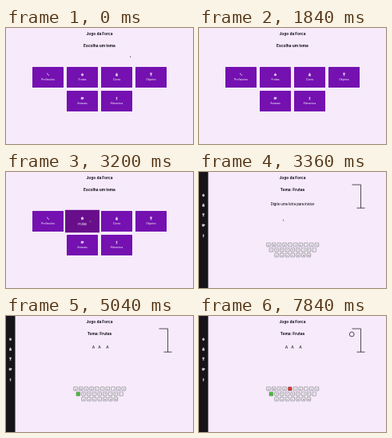
An HTML page for the animation above (8 s loop, 234 by 146 pixels).

```html
<!DOCTYPE html>
<html lang="pt">
<head>
<meta charset="utf-8">
<style>
  html, body { margin: 0; width: 100%; height: 100%; overflow: hidden; background: #f6eafb; }
  svg { display: block; width: 100vw; height: 100vh; }
  text { font-family: Inter, "Open Sans", sans-serif; text-anchor: middle; fill: #15101a; }
  .title { font-size: 4.8px; font-weight: 700; }
  .label { font-size: 3.4px; fill: #fff; }
  .key { font-size: 2.5px; fill: #333; }
</style>
</head>
<body>
<svg id="stage" viewBox="0 0 234 146">
  <rect width="234" height="146" fill="#f6eafb"/>
  <text class="title" x="117" y="8.8">Jogo da Forca</text>
  <g id="menu">
    <text class="title" x="117" y="24.2">Escolha um tema</text>
  </g>
  <g id="game">
    <rect width="11.5" height="146" fill="#171419"/>
    <text class="title" x="117" y="24.2">Tema: Frutas</text>
    <text id="hint" x="117" y="42" font-size="4.2" font-weight="500">Digite uma letra para iniciar</text>
    <g id="word" font-size="5"></g>
    <g fill="none" stroke="#2b2430" stroke-width="0.8">
      <path d="M191.5 16H202.5V45.3M197.5 45.3H207.5"/>
      <circle id="head" cx="191.2" cy="23" r="2.9"/>
    </g>
  </g>
  <path id="cursor" d="M0 0V2.3L.6 1.8L1.6 1.7Z" fill="#222" stroke="#fff" stroke-width="0.2"/>
</svg>
<script>
const $ = id => document.getElementById(id);
const LOOP = 8000, STEP = 80;
const PURPLE = [116, 17, 176], HOVER = [104, 14, 139];
const WHITE = [250, 246, 252], GREEN = [76, 211, 55], RED = [237, 54, 54];

function add(parent, tag, attrs, text) {
  const el = document.createElementNS("http://www.w3.org/2000/svg", tag);
  for (const k in attrs) el.setAttribute(k, attrs[k]);
  if (text) el.textContent = text;
  parent.append(el);
  return el;
}

const icons = [
  "M-1.6 -1.3L1.5 1.6M-1.5 -.2L0 -1.6M.4 1.4L1.6 .2",
  "M-1.2 -.4H1.2L.8 1.6H-.8ZM0 -.4V-1.7",
  "M0 -1.7L1 0V1.5H-1V0ZM-1.5 1.6H1.5",
  "M-1 -1.6H1L.6 .2H-.6ZM0 .2V1.5M-1 1.6H1",
  "M-1.4 -1.2V1.2H.8V0H1.6V-1H.4Z",
  "M0 -1.7V1.6M-1 -.8L0 .2L1 -.8M-1 1.6H1"
];
const icon = (parent, i, x, y) => add(parent, "path", {
  d: icons[i], transform: `translate(${x} ${y})`,
  fill: "#fff", "fill-opacity": 0.7, stroke: "#fff", "stroke-width": 0.5
});

// Theme cards, drawn around their own centres
const themes = ["Profissões", "Frutas", "Cores", "Objetos", "Animais", "Alimentos"];
const cards = themes.map((name, i) => {
  const x = i < 4 ? 52.5 + 43 * i : 95.5 + 43 * (i - 4);
  const y = i < 4 ? 62 : 92;
  const g = add($("menu"), "g", { transform: `translate(${x} ${y})` });
  const box = add(g, "rect", { x: -19.5, y: -13, width: 39, height: 26, rx: 0.6, fill: `rgb(${PURPLE})` });
  icon(g, i, 0, -3.6);
  add(g, "text", { class: "label", y: 4.4 }, name);
  return { g, box, x, y };
});

[29, 41.5, 54, 67, 80].forEach((y, i) => icon($("game"), i + 1, 5.5, y));

const keys = {};
["QWERTYUIOP", "ASDFGHJKL", "ZXCVBNM"].forEach((row, r) => {
  [...row].forEach((ch, i) => {
    const x = 117.2 + (i - (row.length - 1) / 2) * 6.72, y = 91.6 + r * 6.5;
    keys[ch] = add($("game"), "rect", {
      x: x - 2.3, y: y - 2.3, width: 4.6, height: 4.6, rx: 0.5,
      fill: `rgb(${WHITE})`, stroke: "#55505a", "stroke-width": 0.5
    });
    add($("game"), "text", { class: "key", x, y: y + 0.9 }, ch);
  });
});

[109.5, 117, 127].forEach(x => add($("word"), "text", { x, y: 41 }, "A"));

const path = [[0, 155, 35], [640, 155, 35], [880, 136, 42], [1600, 114, 50],
  [2080, 114, 50], [2320, 114, 51.5], [2560, 105, 61], [3200, 105, 61], [3360, 105, 59.5], [LOOP, 105, 59.5]];

const ramp = (t, from, to) => Math.min(1, Math.max(0, (t - from) / (to - from)));
const mix = (a, b, p) => a.map((v, i) => v + (b[i] - v) * p);
const paint = (el, a, b, p) => el.setAttribute("fill", `rgb(${mix(a, b, p).map(Math.round)})`);
const show = (el, on) => el.setAttribute("visibility", on ? "visible" : "hidden");

function cursorAt(t) {
  const i = path.findIndex((p, n) => n && p[0] >= t);
  const [t0, ...a] = path[i - 1], [t1, ...b] = path[i];
  return mix(a, b, ramp(t, t0, t1));
}

function draw(t) {
  const playing = t >= 3360, guessed = t >= 4800;
  $("menu").style.display = playing ? "none" : "";
  $("game").style.display = playing ? "" : "none";

  const hover = ramp(t, 1920, 2160), card = cards[1];
  paint(card.box, PURPLE, HOVER, hover);
  card.g.setAttribute("transform", `translate(${card.x} ${card.y}) scale(${1 + 0.1 * hover})`);

  show($("hint"), !guessed);
  show($("word"), guessed);
  show($("head"), t >= 6320);
  paint(keys.A, WHITE, GREEN, ramp(t, 4720, 5040));
  paint(keys.T, WHITE, RED, ramp(t, 6240, 6560));

  show($("cursor"), t < 4160);
  $("cursor").setAttribute("transform", `translate(${cursorAt(t)})`);
}

const start = performance.now();
function tick() {
  const t = (performance.now() - start) % LOOP;
  draw(Math.floor(t / STEP) * STEP);
  requestAnimationFrame(tick);
}
tick();
</script>
</body>
</html>
```
